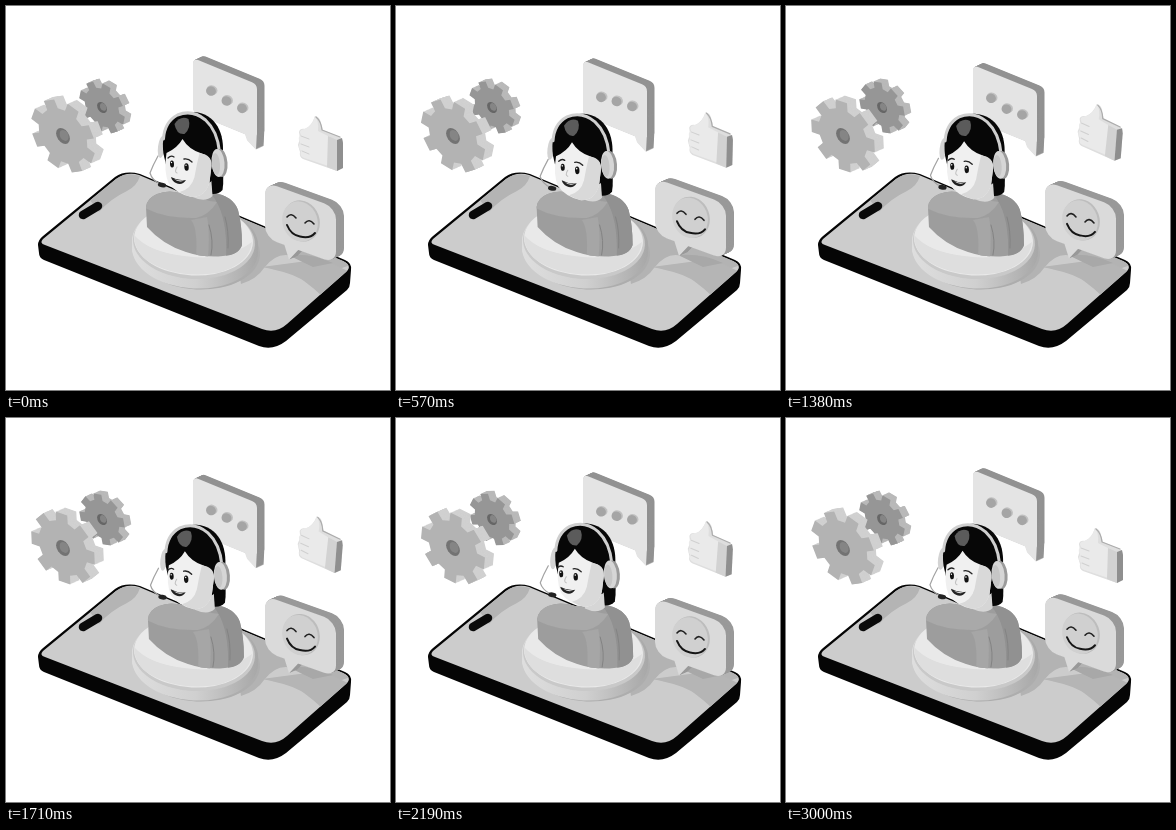
An HTML page with a canvas for the animation above (3.03 s loop, 384 by 384 pixels).

```html
<!DOCTYPE html>
<html lang="en">
<head>
<meta charset="utf-8">
<style>
html, body { margin: 0; width: 100%; height: 100%; overflow: hidden; background: #fff; }
canvas { display: block; width: 384px; height: 384px; }
</style>
</head>
<body>
<canvas id="stage" width="384" height="384"></canvas>
<script>
const ctx = document.getElementById('stage').getContext('2d');
const LOOP = 3030, STEP = 30, TAU = Math.PI * 2;

function fill(d, color) {
  ctx.fillStyle = color;
  ctx.fill(typeof d === 'string' ? new Path2D(d) : d);
}

function line(d, color, width) {
  ctx.strokeStyle = color;
  ctx.lineWidth = width;
  ctx.lineCap = ctx.lineJoin = 'round';
  ctx.stroke(typeof d === 'string' ? new Path2D(d) : d);
}

function oval(x, y, rx, ry, color, turn = 0) {
  ctx.beginPath();
  ctx.ellipse(x, y, rx, ry, turn, 0, TAU);
  ctx.fillStyle = color;
  ctx.fill();
}

function group(draw) {
  ctx.save();
  draw();
  ctx.restore();
}

function ramp(x0, y0, x1, y1, ...colors) {
  const g = ctx.createLinearGradient(x0, y0, x1, y1);
  colors.forEach((c, i) => g.addColorStop(i / (colors.length - 1), c));
  return g;
}

// Upright slab: back layers first, then the lit front face
function slab(shape, x, y, sx, slope, dx, dy, side, face) {
  const n = 14;
  for (let i = n; i >= 0; i--) {
    group(() => {
      ctx.transform(sx, slope, 0, 1, x + dx * i / n, y + dy * i / n);
      fill(shape, i ? side : face);
    });
  }
}

function gearShape(r, root, turn) {
  const p = new Path2D(), teeth = 8, pitch = TAU / teeth;
  for (let i = 0; i < teeth; i++) {
    const a = turn + i * pitch;
    for (const [k, rad] of [[-.31, root], [-.23, r], [.23, r], [.31, root]]) {
      p.lineTo(rad * Math.cos(a + k * pitch), rad * Math.sin(a + k * pitch));
    }
  }
  p.closePath();
  return p;
}

function gear(x, y, r, turn, dx, dy, side, face, hole) {
  slab(gearShape(r, r * .76, turn), x, y, .93, .36, dx, dy, side, face);
  group(() => {
    ctx.transform(.93, .36, 0, 1, x, y);
    oval(0, 0, r * .215, r * .215, hole);
    oval(1.2, -1, r * .14, r * .15, '#858585');
  });
}

function bubbleShape(w, h, r, tail) {
  const p = new Path2D(), t = new Path2D();
  p.roundRect(0, 0, w, h, r);
  tail.forEach(([x, y]) => t.lineTo(x, y));
  t.closePath();
  p.addPath(t);
  return p;
}

const chatShape = bubbleShape(64, 55, 5, [[50, 50], [64, 46], [63, 66], [54, 60]]);
const smileShape = bubbleShape(71, 56, 12, [[18, 52], [36, 52], [24, 69]]);

function phone() {
  fill('M32 239 Q32 234 37 230 L109 171 Q119 164 134 168 L339 254 Q346 257 345 264 L344 277 Q344 281 341 284 L280 335 Q267 345 253 340 L38 254 Q33 252 33 247 Z', '#050505');
  const top = new Path2D('M37 233 L110 173 Q121 165 133 169 L337 255 Q347 260 340 266 L281 318 Q270 328 256 323 L39 239 Q33 237 37 233 Z');
  fill(top, '#cccccc');
  group(() => {
    ctx.clip(top);
    fill('M83 193 L111 171 Q122 166 134 170 Q131 180 121 185 Q104 193 93 206 Z', '#b4b4b4');
    fill('M224 205 L350 257 L330 264 Q307 260 289 251 Q272 244 258 262 Q251 273 235 278 Z', '#b3b3b3');
    fill('M256 261 Q287 267 298 275 Q309 283 318 292 L346 267 L316 253 Z', '#b5b5b5');
    fill('M282 249 Q307 247 327 257 L307 261 Z', '#a8a8a8');
  });
  line('M77 209 L92 200', '#0a0a0a', 8.5);
}

function base() {
  oval(192, 246, 62, 37.5, '#adadad', .05);
  const wall = ramp(126, 0, 253, 0, '#dedede', '#d0d0d0', '#a7a7a7');
  for (let y = 244; y >= 237; y--) oval(189, y, 63, 38.5, wall, .05);
  oval(188, 236, 61, 37, '#c9c9c9', .05);
  oval(187.5, 234, 59.5, 35.5, '#e9e9e9', .05);
  fill('M128 229 Q143 246 178 250 Q219 256 246 236 Q244 258 211 267 Q167 273 139 253 Q128 243 128 229 Z', '#dedede');
}

function torso(c) {
  group(() => {
    ctx.translate(2 * c, 0);
    const body = new Path2D('M141 221 L140 201 Q141 192 151 188 Q163 183 178 188 L206 186 Q227 190 232 204 Q236 219 236 239 Q233 249 217 250 Q198 252 180 246 Q157 239 141 221 Z');
    fill(body, '#9d9d9d');
    group(() => {
      ctx.clip(body);
      fill('M137 182 L172 182 Q192 194 211 196 Q203 209 190 212 Q158 213 137 201 Z', '#a9a9a9');
      fill('M205 188 Q222 207 220 252 L241 252 L239 190 Z', '#919191');
      fill('M185 214 Q192 222 190 252 L202 252 Q204 225 201 211 Z', '#a6a6a6');
    });
    line('M203 219 Q208 235 205 249 M219 211 Q223 225 222 242', '#838383', 1);
  });
}

function face(c, s) {
  fill('M159 147 Q170 142 175 133 Q181 143 193 147 Q204 150 204 160 L202 176 Q198 191 184 191 Q169 188 161 177 Q156 165 159 147 Z', '#f0f0f0');
  fill('M192 147 Q205 149 204 160 L202 176 Q198 191 184 191 Q177 189 172 186 Q184 183 187 171 Q189 159 192 147 Z', '#d9d9d9');
  // features slide sideways as the head turns
  ctx.translate(-2.5 - 2 * c + 2 * s, 0);
  oval(167, 158, 2, 3.5, '#111', -.05);
  oval(181.5, 161, 2.2, 3.8, '#111', -.05);
  oval(166.5, 156.5, .7, .8, '#fff');
  oval(181, 159.3, .7, .8, '#fff');
  line('M163 152 Q166 149 169 151 M179 153 Q183 152 187 156', '#242424', 1.3);
  line('M172 161 Q169 166 172 167', '#c0c0c0', 1.1);
  fill('M166 171 Q173 175 181 174 Q177 180 171 177 Q167 175 166 171 Z', '#222');
  fill('M169 173 Q174 175 179 174.5 Q174 177 169 173 Z', '#fff');
}

function head(c, s) {
  group(() => {
    ctx.translate(1.5 + 2 * c - 1.2 * s, 1.5 * c + 1.5 * s);
    fill('M199 150 L214 151 Q217 173 215 184 Q210 190 199 187 Z', '#080808');
    fill('M184 173 L203 162 L205 190 Q198 197 185 191 Z', '#d6d6d6');
    oval(154, 141, 3.5, 11, '#d3d3d3', .12);
    fill('M156 148 C152 119 168 105 187 106 C208 108 218 127 215 151 Q212 169 203 176 L186 182 L160 165 Z', '#070707');
    group(() => {
      ctx.translate(0, 1.6 * s);
      face(c, s);
    });
    fill('M167 118 Q173 109 181 113 Q184 122 177 128 Q169 129 167 118 Z', '#5b5b5b');
    // headset
    line('M156 133 Q157 116 170 109 Q185 103 198 114 Q210 125 212 146', '#cfcfcf', 3);
    oval(213.5, 157, 6.5, 14, '#9b9b9b', -.08);
    oval(210.5, 157, 6.5, 14, '#d6d6d6', -.08);
    oval(208.5, 158, 4, 11, '#c6c6c6', -.08);
  });
  group(() => {
    ctx.translate(.5 * c, 1.5 * c + 3.1 * s);
    line('M152 150 Q147 159 144 167 Q146 174 154 178', '#a2a2a2', 1.2);
    oval(156, 179, 4.2, 2.4, '#222', .15);
  });
}

function chat(c, w) {
  const y = 52 + 7 * c;
  slab(chatShape, 187, y, 1, .41, 7.5, -3.5, '#929292', '#e4e4e4');
  [87, 94.5, 99.5].forEach((py, i) => {
    const dy = 7 * c - 2.4 * Math.cos(2 * w - i * Math.PI / 2);
    oval(206 + i * 15.5, py + dy - .5, 5.6, 4.8, '#c1c1c1', .4);
    oval(205 + i * 15.5, py + dy + .5, 5, 4.7, '#a5a5a5', .4);
  });
}

function thumb(c) {
  group(() => {
    ctx.translate(-.5 * c, -11.5 * c);
    ctx.translate(318, 140);
    ctx.rotate(.08 * c);
    ctx.translate(-318, -140);
    fill('M309 110 Q314 111 315 117 L317 124 L334 131 Q337 133 337 137 L337 162 L331 165 L297 153 Q293 151 294 146 L292 139 L294 132 L293 126 Q294 122 299 123 Q306 120 309 110 Z', '#dedede');
    fill('M309 110 Q313 115 312 125 L324 131 L322 160 L298 152 Q293 150 295 145 Q291 141 294 137 Q291 131 295 129 Q292 124 298 123 Q306 121 309 110 Z', '#eaeaea');
    fill('M322 130 L331 134 L331 165 L321 161 Z', '#d2d2d2');
    fill('M331 134 L336 132 L337 137 L337 162 L331 165 Z', '#8f8f8f');
    line('M310 111 Q315 115 316 124 L334 131', '#acacac', 1.2);
    line('M295 130 L303 133 M295 138 L303 141 M296 145 L303 148', '#d0d0d0', 1);
  });
}

function smiley(s) {
  slab(smileShape, 259, 176 - 4 * s, 1, .36, 8, -3.5, '#999999', '#dadada');
  group(() => {
    ctx.translate(0, -4 * s);
    oval(295.5, 215, 18, 21, '#bdbdbd', -.35);
    oval(294, 215.5, 17.5, 20.5, '#d0d0d0', -.35);
    line('M281 211 Q285 206 290 212 M299 217 Q303 212 308 218', '#202020', 1.6);
    line('M281 219 Q285 229 294 230.5 Q304 233 309 227', '#151515', 2);
  });
}

function draw(t) {
  const w = TAU * t / LOOP;
  const c = (1 - Math.cos(w)) / 2, s = Math.sin(w);
  ctx.fillStyle = '#fff';
  ctx.fillRect(0, 0, 384, 384);
  const turn = .39 * c;
  gear(96, 101.5, 24.5, turn + .2, 6.5, -3, '#b9b9b9', '#969696', '#666');
  gear(57, 130, 34.5, -2.03 - turn, 9, -4, '#d0d0d0', '#b3b3b3', '#737373');
  phone();
  base();
  chat(c, w);
  torso(c);
  head(c, s);
  thumb(c);
  smiley(s);
}

function tick() {
  const t = performance.now() % LOOP;
  draw(Math.floor(t / STEP) * STEP);
  requestAnimationFrame(tick);
}
tick();
</script>
</body>
</html>
```
